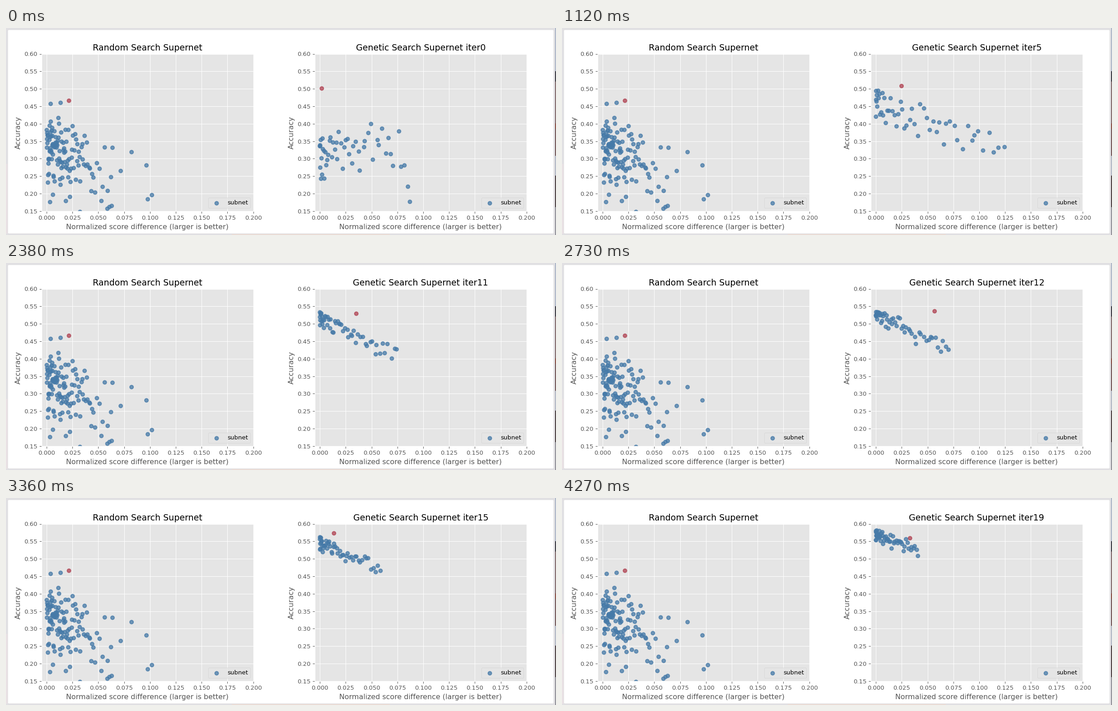
Recreate the animation shown at these times as a matplotlib script. Size 1218 by 460 pixels, loop 4.34 s.

```python
import numpy as np
import matplotlib.pyplot as plt
from matplotlib.animation import FuncAnimation
from matplotlib.patches import FancyBboxPatch, Rectangle
from matplotlib.ticker import FormatStrFormatter, MultipleLocator

W, H, DPI = 1218, 460, 80
FRAMES, STEP, ITERS = 62, 70, 20
K = 95.2 / DPI  # point sizes are designed for about 95 dpi
GREY, PANEL = "#555555", "#e5e5e5"
BLUE = (0.275, 0.48, 0.66, 0.75)
RED = (0.69, 0.26, 0.32, 0.75)

plt.rcParams.update({
    "font.family": "DejaVu Sans", "font.size": 10 * K,
    "axes.facecolor": PANEL, "axes.edgecolor": "white", "axes.linewidth": K,
    "axes.grid": True, "axes.axisbelow": True, "axes.labelcolor": GREY,
    "axes.labelsize": 12 * K, "axes.labelpad": 4 * K,
    "axes.titlesize": 14.4 * K, "axes.titlepad": 6 * K,
    "grid.color": "white", "grid.linewidth": 0.8 * K,
    "legend.facecolor": PANEL, "legend.edgecolor": "0.8",
    "legend.framealpha": 0.8, "patch.linewidth": 0.5 * K,
})
for axis in ("xtick", "ytick"):
    plt.rcParams.update({
        f"{axis}.color": GREY, f"{axis}.major.size": 3.5 * K,
        f"{axis}.major.pad": 3.5 * K, f"{axis}.major.width": 0.8 * K,
    })

# All points are (score difference, accuracy) in thousandths.
RANDOM_BEST = (21.6, 466)
RANDOM_EDGE = [(3.9, 457), (13.5, 460), (82.2, 319), (96.6, 281), (71.7, 265),
               (101.9, 196), (97.9, 184), (63, 165), (60.8, 162), (58.8, 157),
               (32.3, 148), (18.6, 179), (3.3, 176), (6.1, 197)]

# Best subnet of the genetic search at a few generations.
BEST_ITER = (0, 3, 7, 11, 12, 15, 19)
BEST_X = (1.8, 18.1, 31.5, 35.2, 56.8, 13.6, 33)
BEST_Y = (501, 510, 506, 529, 536, 573, 559)
BEST_DRAWN_FIRST = 3  # the legend takes the colour of the first dot
POPULATION = 52


def strata(rng, n):
    """Evenly spread random numbers in 0..1."""
    return (np.arange(n) + rng.random(n)) / n


def random_search(n=122):
    rng = np.random.default_rng(5)
    x = -22 * np.log(1 - 0.95 * strata(rng, n))
    y = 345 - 1.3 * x + rng.triangular(-125, 15, 100, n)
    return np.vstack([np.column_stack([x, y]), RANDOM_EDGE, RANDOM_BEST])


def generation(it):
    """A cloud that rises, narrows and tightens with each iteration."""
    rng = np.random.default_rng(100 + it)
    width = np.interp(it, (0, 3, 11, 19), (90, 142, 76, 42))
    height = np.interp(it, (0, 3, 7, 19), (335, 446, 500, 571))
    drop = np.interp(it, (0, 3, 19), (20, 170, 45))
    noise = 12 + 53 * np.exp(-it / 5)
    reach = strata(rng, POPULATION) ** 2
    x = width * reach
    y = height - drop * reach + noise * rng.triangular(-2.2, 0.3, 1.3, POPULATION)
    best = [np.interp(it, BEST_ITER, v) for v in (BEST_X, BEST_Y)]
    return np.vstack([best, np.column_stack([x, y])])


def draw_window(fig):
    bg = fig.add_axes([0, 0, 1, 1], zorder=-1)
    bg.set(xlim=(0, W), ylim=(H, 0))
    bg.axis("off")

    def bar(x, y, w, h, color):
        bg.add_patch(Rectangle((x, y), w, h, fc=color, lw=0))

    bar(0, 0, W, H, "#e1e0e3")
    bar(0, 302, 4, 155, "#e9e1e4")
    bar(500, 458, 350, 2, "#ecdcd5")
    strip = [(0, "#a9b4c6"), (96, "#33333b"), (119, "#7d6566"),
             (212, "#83463a"), (224, "#6d5150"), (284, "#aeb5c2"),
             (328, "#453a3a"), (398, "#8d8c94")]
    for y, color in strip:
        bar(1216, y, 2, H - y, color)
    bg.add_patch(FancyBboxPatch((6, 6), 1205, 449, fc="white", ec="#d8d8da",
                                lw=0.6, boxstyle="round,pad=2,rounding_size=2"))


def make_chart(fig, left, title):
    ax = fig.add_axes([left / W, (H - 407) / H, 469 / W, 349.5 / H])
    ax.set(xlim=(-0.005, 0.2), ylim=(0.15, 0.6), ylabel="Accuracy",
           xlabel="Normalized score difference (larger is better)")
    ax.set_title(title, color="black")
    ax.xaxis.set_major_locator(MultipleLocator(0.025))
    ax.yaxis.set_major_locator(MultipleLocator(0.05))
    ax.xaxis.set_major_formatter(FormatStrFormatter("%.3f"))
    ax.yaxis.set_major_formatter(FormatStrFormatter("%.2f"))
    dots = ax.scatter([0], [0], s=36 * K**2, color=[BLUE],
                      linewidths=1.5 * K, label="subnet")
    legend = ax.legend(loc="lower right")
    return ax, dots, legend.legend_handles[0]


def place(dots, points, best):
    colors = np.tile(BLUE, (len(points), 1))
    colors[best] = RED
    dots.set_offsets(points / 1000)
    dots.set_color(colors)


fig = plt.figure(figsize=(W / DPI, H / DPI), dpi=DPI)
draw_window(fig)
_, random_dots, _ = make_chart(fig, 78.6, "Random Search Supernet")
place(random_dots, random_search(), -1)
ax, dots, key = make_chart(fig, 683.8, "Genetic Search Supernet iter0")
generations = [generation(i) for i in range(ITERS)]


def update(frame):
    it = int((frame + 0.5) * ITERS / FRAMES)
    ax.set_title(f"Genetic Search Supernet iter{it}", color="black")
    place(dots, generations[it], 0)
    key.set_color([RED if it == BEST_DRAWN_FIRST else BLUE])
    return ()


anim = FuncAnimation(fig, update, frames=FRAMES, interval=STEP,
                     init_func=lambda: update(0), repeat=True, repeat_delay=0)
plt.show()
```
